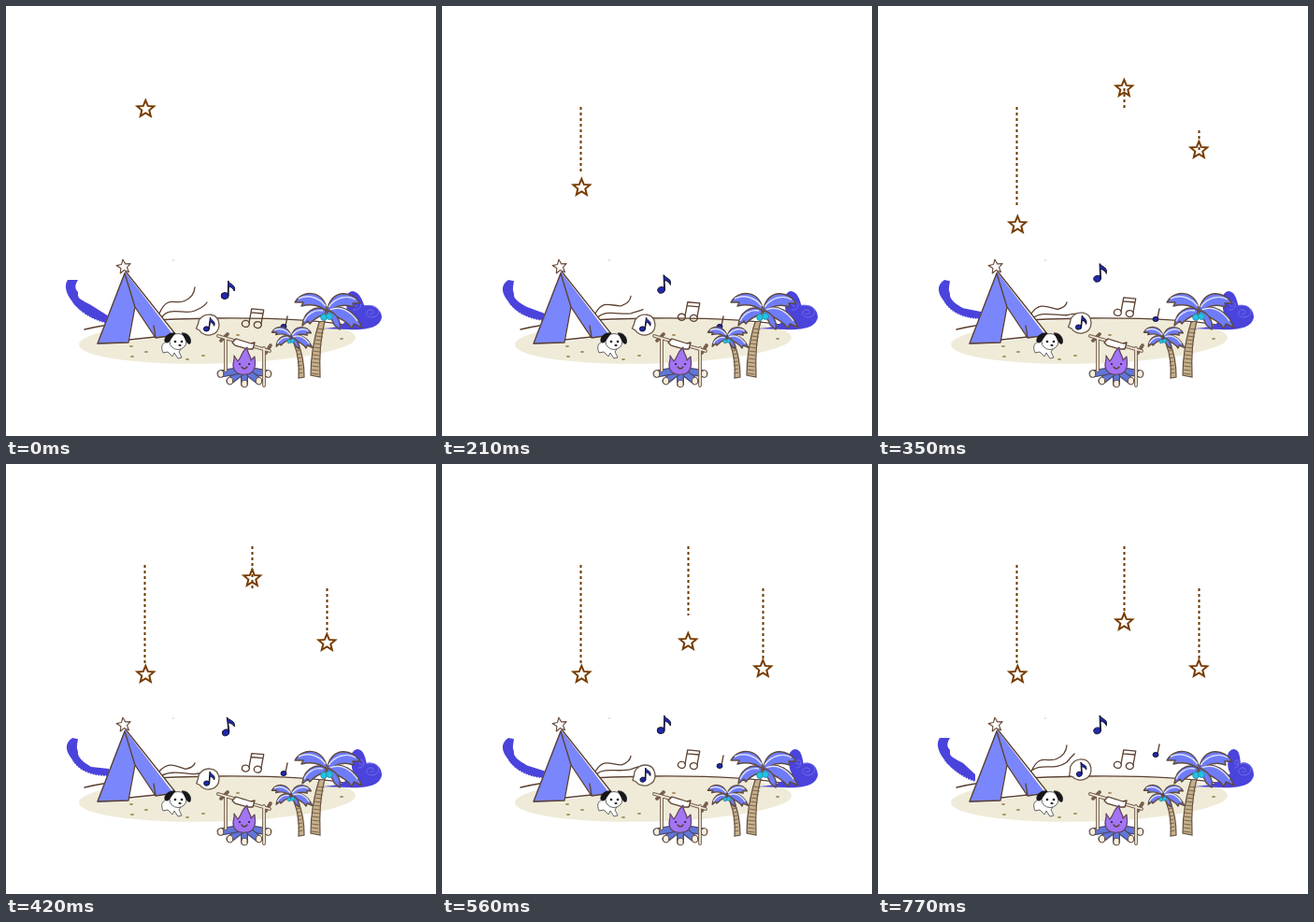
Write an HTML page that moves like this. It is 460 px wide and 460 px high and loops after 840 ms.

```html
<!DOCTYPE html>
<html lang="en">
<head>
<meta charset="utf-8">
<title>Beach camp</title>
<style>
html, body { margin: 0; width: 100%; height: 100%; overflow: hidden; background: #fff }
svg { display: block; width: 100%; height: 100% }
path, ellipse, circle { vector-effect: non-scaling-stroke }
.line { fill: none; stroke: #5b4030; stroke-width: 1.3; stroke-linecap: round; stroke-linejoin: round }
.string { fill: none; stroke: #6b3800; stroke-width: 2; stroke-dasharray: 3 3 }
.wave { fill: #4a43dc }
.curl { fill: none; stroke: #7470ee; stroke-width: .9 }
.ink { fill: #2028b0; stroke: #15152e; stroke-width: 1 }
</style>
</head>
<body>
<svg viewBox="0 0 460 460">
  <defs>
    <path id="star"/>
    <g id="note" class="ink">
      <ellipse cx="-2.5" cy="6.5" rx="3.8" ry="3.3" transform="rotate(-20 -2.5 6.5)"/>
      <path d="M.6 6-1.2-10C1-6 8-7 6.8 0 5-3 2-4 .2-4L1.4 6Z"/>
    </g>
    <g id="crown" fill="#6f7cf8" stroke="#5f4a40" stroke-width="1.4" stroke-linejoin="round">
      <path d="M345 325C358 317 374 327 381 344L372 340 370 345C364 336 354 332 345 329Z"/>
      <path d="M344 323C350 302 371 305 379 318L371 318 372 322C360 318 352 321 345 328Z"/>
      <path d="M343 323C338 304 317 303 309 317L318 317 316 321C328 318 336 320 343 327Z"/>
      <path d="M342 325C330 319 318 328 317 342L323 337 325 340C332 332 338 331 342 329Z"/>
      <path d="M344 326C352 327 359 336 357 346L351 341C349 335 346 332 343 330Z"/>
      <path d="M342 321C335 312 324 308 313 313M345 322C353 311 366 309 374 314M347 325C358 320 369 327 376 337M339 326C330 324 322 330 319 337" fill="none" stroke="#dbe0ff"/>
      <g fill="#20c4e4" stroke="#2787a0" stroke-width=".8">
        <circle cx="340" cy="333" r="3.4"/><circle cx="346" cy="332" r="3.4"/>
      </g>
    </g>
  </defs>

  <ellipse cx="226" cy="358.500" rx="148" ry="24" fill="#efebd8" transform="rotate(-1.5 226 358.5)"/>
  <path class="line" d="M84 346C145 331 305 330 374 343"/>
  <path d="M133 364h2M149 370h2M134 375h2M164 352h2M193 378h2M210 374h2M247 352h2M358 356h2" stroke="#aa9365" stroke-width="1.8" stroke-linecap="round"/>
  <circle cx="179" cy="272" r=".8" fill="#bbb"/>

  <path id="leftWave" class="wave"/>
  <path id="leftFringe" fill="none" stroke="#4a43dc" stroke-width="4" stroke-dasharray="1.6 1.2"/>
  <path id="rightWave" class="wave"/>
  <path id="curls" class="curl"/>

  <path id="smoke" class="line"/>
  <use id="bigNote" href="#note"/>
  <g id="pair" class="line">
    <ellipse cx="-6" cy="7.500" rx="4" ry="3.500"/><ellipse cx="7" cy="7.500" rx="4" ry="3.500"/>
    <path d="M-2.500 6-1-9 12-9 10.500 6M-1.500-5 11.500-5"/>
  </g>
  <g id="small">
    <path class="line" d="M2-1 4-11"/><ellipse class="ink" rx="3" ry="2.500"/>
  </g>
  <g id="bubble">
    <path d="M-10-5C-4-14 11-13 11.500 0 11 13-5 14-9.500 6L-13 4-11-1Z" fill="#fff" stroke="#6c5848" stroke-width="1.3"/>
    <use href="#note" transform="translate(1 0) rotate(14) scale(.78)"/>
  </g>

  <g id="tent" stroke-linejoin="round">
    <path d="M128 284 182 352 131 359 97 362Z" fill="#fff"/>
    <path d="M127 284 97 362 131 360 138 322 160 355 179 352Z" fill="#7a86fb"/>
    <path d="M138 322 131 359 160 355Z" fill="#fff"/>
    <path d="M138 322 158 340 160 354Z" fill="#7a86fb"/>
    <path class="line" d="M127 286 98 361 131 360 138 322 160 355 182 352 128 284M127 286 138 322M132 357 160 354M158 342 160 354"/>
    <use href="#star" transform="translate(126 279) rotate(-8) scale(.84)" fill="#fff" stroke="#6c5040" stroke-width="1.2"/>
  </g>

  <g id="dog" stroke="#555" stroke-width=".9" stroke-linejoin="round">
    <path d="M175 359C167 359 165 364 168 371L173 370 178 375 180 371 184 377 188 376 185 370 188 365Z" fill="#fff"/>
    <ellipse cx="184" cy="359" rx="9" ry="8.500" fill="#fff"/>
    <path d="M181 350C174 349 169 354 170 359 174 363 176 355 181 350ZM188 350C194 349 199 355 197 361 193 363 192 354 188 350Z" fill="#17171b" stroke="#17171b"/>
    <g fill="#111" stroke="none"><circle cx="181" cy="359" r="1.3"/><circle cx="188" cy="359" r="1.3"/><ellipse cx="186" cy="363" rx="1.6" ry="1"/></g>
  </g>

  <g id="fire" stroke-linecap="round" stroke-linejoin="round">
    <g id="logs"></g>
    <path id="frame" d="M235 356V390M276 366V406M227 353 282 369M230 358 237 351M278 371 283 363" fill="none" stroke="#76604d" stroke-width="3.8"/>
    <path d="M235 356V390M276 366V406M227 353 282 369" fill="none" stroke="#f1e9da" stroke-width="1.8"/>
    <path class="line" style="fill:#fff" d="M242 360 246 356 262 361 266 360 264 367 259 367 245 363Z"/>
    <path d="M258 365C251 371 252 376 248 380L244 374C245 380 241 383 244 389 248 396 262 396 265 389 268 384 266 380 266 375L262 379C262 373 257 371 258 365Z" fill="#a374f4" stroke="#624460" stroke-width="1.2"/>
    <path class="line" d="M252 386Q255 390 258 386"/>
    <path d="M250 383h.1M260 383h.1" stroke="#332050" stroke-width="2.2"/>
  </g>

  <g id="palms">
    <path d="M335 338 341 337C336 356 335 375 336 397L326 395C326 377 329 357 335 338Z" fill="#c6b08c" stroke="#645040" stroke-width="1.2"/>
    <path d="M308 361 312 360C317 371 319 383 319 397L313 398C314 384 312 371 308 361Z" fill="#c6b08c" stroke="#645040" stroke-width="1.2"/>
    <path id="rings" fill="none" stroke="#7b6650"/>
    <use href="#crown"/>
    <use href="#crown" transform="translate(99 159) scale(.6)"/>
  </g>
  <g id="hanging"></g>
</svg>

<script>
const FRAME = 70, COUNT = 12;
const $ = id => document.getElementById(id);
const draw = (id, d) => $(id).setAttribute('d', d);
const place = (id, x, y, angle = 0) =>
  $(id).setAttribute('transform', `translate(${x} ${y}) rotate(${angle})`);
const after = (step, start) => Math.max(0, step - start);
const smooth = p => { p = Math.min(1, Math.max(0, p)); return p * p * (3 - 2 * p); };

// Each star falls at a steady speed, overshoots, then climbs back to rest.
const stars = [
  { x: 149, top: 108, start: 0, from: 110, speed: 28, rest: 225, settle: 6, lead: 0, length: 105 },
  { x: 263, top: 88, start: 5, from: 88, speed: 34, rest: 169, settle: 6, lead: 1, length: 74 },
  { x: 343, top: 133, start: 5, from: 154, speed: 37, rest: 219, settle: 3, lead: 1, length: 77 }
];
const starY = (s, n) => Math.min(s.from + s.speed * n, s.rest + 9 * Math.max(0, s.settle - n));
const stringLength = (s, n) => Math.min(s.length, 23 * (n + s.lead));

draw('star', 'M' + Array.from({ length: 10 }, (_, i) => {
  const radius = i % 2 ? 4.2 : 9.4, angle = i * Math.PI / 5;
  return `${radius * Math.sin(angle)} ${-radius * Math.cos(angle)}`;
}).join('L') + 'Z');

$('hanging').innerHTML = stars.map((s, i) =>
  `<g id="hang${i}"><path id="string${i}" class="string"/>` +
  `<use id="star${i}" href="#star" fill="none" stroke="#783c00" stroke-width="2"/></g>`).join('');

let logs = '';
for (let degrees = 20; degrees <= 160; degrees += 35) {
  const angle = degrees * Math.PI / 180;
  const x = 255 + 27 * Math.cos(angle), y = 388 + 16 * Math.sin(angle);
  logs += `<path d="M255 389L${x} ${y}" stroke="#4c4a70" stroke-width="8"/>` +
    `<path d="M255 389L${x} ${y}" stroke="#6176d8" stroke-width="5.5"/>` +
    `<ellipse cx="${x}" cy="${y}" rx="3.2" ry="3.8" fill="#f7efdf" stroke="#665040"/>`;
}
$('logs').innerHTML = logs;

let rings = '';
for (let y = 345; y < 394; y += 4) {
  rings += `M${326.5 + ((396 - y) / 58) ** 2 * 8} ${y}l8 1`;
  if (y > 364) rings += `M${310 + (y - 364) / 11} ${y}l5 -1`;
}
draw('rings', rings);

function drawWaves(step, swing) {
  const lift = 6 * swing, sag = 4 * swing, round = Math.min(5, 12 * swing);
  const endX = 110 - after(step, 9) * 3, endY = 339 - lift;
  draw('leftWave', `M${66 + round} 293L77 ${293 + round / 4}C${74 + round / 2} 298 ${73 + round / 2} 302 ${77 - round / 5} ${306 - round / 3}
    L77 308C76 313 82 ${315 + sag} 91 ${320 + sag}L${endX} ${endY - 7}V${endY}
    C95 ${337 - lift / 2} 78 ${327 + sag / 2} 70 315C64 307 62 299 ${66 + round} 293Z`);
  draw('leftFringe', `M73 316C80 ${326 + sag / 2} 94 ${335 - lift / 2} ${endX} ${endY - 1}`);

  const d = step * .9;
  draw('rightWave', `M335 345C352 345 364 342 ${367 + d} 331C${363 + d} 325 ${365 + d} 319 ${364 + d} 313
    C${364 + d} 308 ${368 + d} 305 ${371 + d} 305C${377 + d} 306 ${381 + d * .6} 313 ${383 + d * .5} 320
    C394 ${319 - d * .2} 402 ${325 - d * .3} 402 333C400 344 386 347 366 346Z`);
  draw('curls', `M${383 + d * .4} 321C400 317 404 332 391 333 383 332 385 324 391 325 396 327 392 331 389 329
    M${371 + d} 325C${383 + d * .5} 326 ${381 + d * .5} 314 ${373 + d} 317 ${370 + d} 321 ${375 + d} 323 ${376 + d} 320`);
}

function drawSmoke(step, swing) {
  const sway = 19 * swing, rise = 1.4 * after(step, 6);
  draw('smoke', `M164 329C173 ${308 + sway * .5} 182 ${321 + sway * .1} 192 ${315 + sway * .6}Q201 ${311 + sway * .7} 202 ${301 + sway}
    M166 ${334 - rise}C174 ${320 + sway * .4} 190 ${331 - rise * .4} 202 ${326 + sway * .3 - rise}
    Q${212 - rise} ${322 + sway * .4 - rise} ${215 - rise * .7} ${317 + sway * .8 - rise}`);
}

function render(step) {
  stars.forEach((s, i) => {
    const n = step - s.start;
    $('hang' + i).setAttribute('visibility', n < 0 ? 'hidden' : 'visible');
    draw('string' + i, `M${s.x + (i ? .5 : -.5)} ${s.top}v${stringLength(s, n)}`);
    place('star' + i, s.x + .3, starY(s, n) + .3);
  });
  const swing = Math.min(step / 6, (COUNT - 1 - step) / 5);
  drawWaves(step, swing);
  drawSmoke(step, swing);
  place('bigNote', 237.5, 304 - 25 * smooth((step - 1) / 6), 4 + 4 * Math.cos(step * Math.PI / 2));
  place('pair', 263, 333 - Math.min(18, 2.4 * step), 5);
  place('small', 297, 343 - 4 * after(step, 3));
  place('bubble', 216.5, 341 - 2 * after(step, 4), -1.6 * after(step, 4));
}

function tick(now) {
  render(Math.floor(now / FRAME) % COUNT);
  requestAnimationFrame(tick);
}
render(0);
requestAnimationFrame(tick);
</script>
</body>
</html>
```
